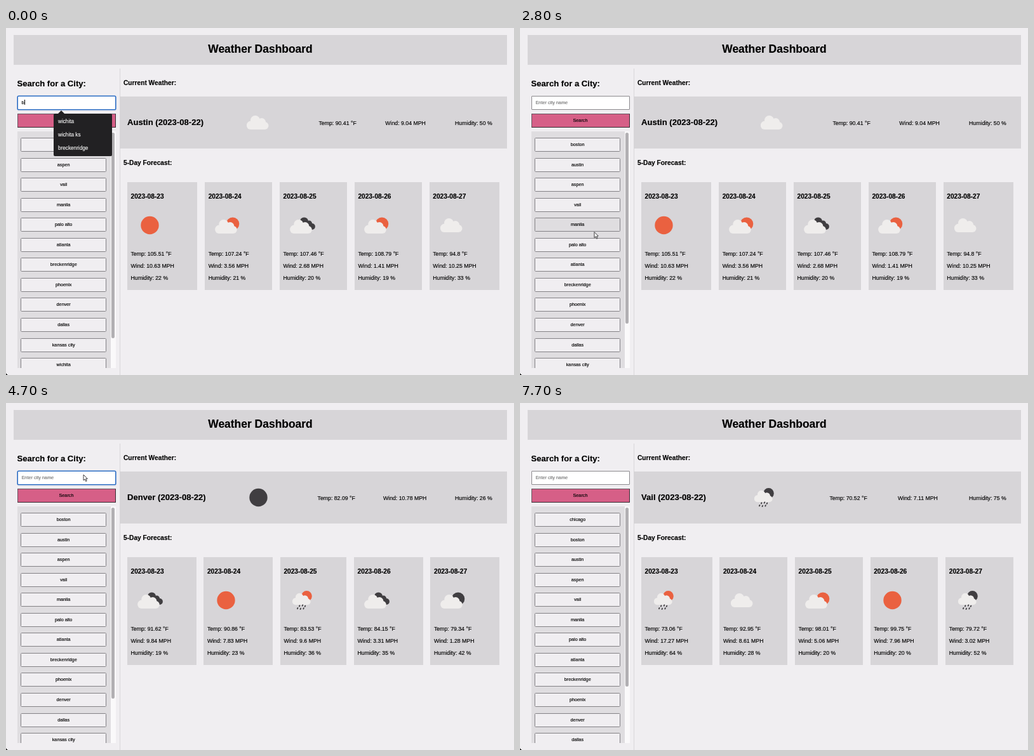
An HTML page that plays this animation: 800 px wide and 547 px high, repeating every 7800 ms.

```html
<!DOCTYPE html>
<html lang="en">
<head>
<meta charset="utf-8">
<title>Weather Dashboard</title>
<style>
  html, body { margin: 0; width: 100%; height: 100%; overflow: hidden; }
  body { background: #f0eef1; color: #000; font: 8.73px/12px "Liberation Sans", Arial, sans-serif;
         -webkit-text-stroke: .15px; }
  #stage { position: relative; width: 800px; height: 547px; overflow: hidden; white-space: nowrap; }
  #stage > *, #list > *, #now > * { position: absolute; box-sizing: border-box; }
  svg { display: block; overflow: visible; }
  h1, h2, h3 { margin: 0; }
  h1 { left: 12px; top: 11px; width: 777px; height: 46.5px; background: #d7d5d8;
       font-size: 17.47px; line-height: 44.5px; text-align: center; }
  h2 { font-size: 13.1px; line-height: 16px; }
  h3 { font-size: 10.2px; line-height: 12px; }
  .rule { left: 178.5px; top: 64px; width: 1px; height: 483px; background: #d9d7da; }
  .corner { left: 0; bottom: 0; width: 4px; height: 4px; background: radial-gradient(circle at 100% 0, transparent 3.6px, #111 4.2px); }

  #field { left: 17.5px; top: 106.5px; width: 155px; height: 22px; background: #fff; border: 1px solid #8b898d;
           border-radius: 1px; padding-left: 6px; font-size: 7.28px; line-height: 20px; color: #757575; }
  #field.focus { border-color: #2a6cc4; box-shadow: 0 0 0 .6px #2a6cc4; border-radius: 2px; }
  #field.typed { color: #000; }
  #field.typed::after { content: ""; display: inline-block; width: .7px; height: 8px; background: #000; vertical-align: -1.5px; }
  .search { left: 17.5px; top: 134.5px; width: 155px; height: 22px; background: #d65f87; border: 1px solid;
            border-color: #66535e #352b31 #352b31 #66535e; font-size: 7.28px; line-height: 20px; text-align: center; }

  #list { left: 17.5px; top: 163px; width: 155px; height: 372.5px; overflow: hidden; background: #dfdde0; }
  .city { left: 5.7px; width: 135px; height: 22px; background: #f0eef1; border: 1px solid #838185; border-radius: 1.5px;
          font-size: 7.28px; line-height: 20px; text-align: center; }
  .city.hover { background: #dfdde0; }
  .track { right: 0; top: 0; width: 7.5px; height: 100%; background: #faf9fa; }
  #thumb { right: 1.5px; top: 1.5px; width: 4.6px; border-radius: 2.3px; background: #b2b0b3; }

  #popup { left: 75px; top: 134.5px; width: 91.5px; height: 67.5px; border-radius: 2px; background: #222123;
           color: #f4f4f4; font-size: 8.2px; line-height: 21px; padding: 2.3px 0 0 7px; }
  #popup::before { content: ""; position: absolute; left: 7px; top: -4.5px; border: 5px solid transparent;
                   border-top: 0; border-bottom-color: #222123; }

  #now { left: 179px; top: 108px; width: 610px; height: 82px; background: #d7d5d8; }
  #now > * { top: 35.8px; }
  #now h2 { left: 12px; top: 32.8px; }
  #now svg { top: 11.3px; }
  #days { left: 191px; top: 243px; width: 586px; height: 169.5px; display: flex; gap: 11.9px; }
  .card { flex: 1 1 auto; box-sizing: border-box; padding: 0 5.5px; background: #d7d5d8; line-height: 18.75px; }
  .card h3 { margin-top: 17.2px; }
  .card svg { margin: 8.8px 0 6.1px; }
</style>
</head>
<body>
<div id="stage">
  <svg width="0" height="0">
    <defs>
      <g id="cloud" fill="#efedec">
        <rect x="-17.5" y="-1" width="34.5" height="12" rx="6"/>
        <circle cx="-4" cy="-3.5" r="7.5"/>
        <circle cx="6.2" cy="-.5" r="6.4"/>
        <circle cx="-11" cy="4" r="6.4"/>
      </g>
      <g id="front"><use href="#cloud" x="-1.7" y="2"/></g>
      <g id="rain">
        <use href="#cloud" transform="translate(-1 -2) scale(.83)"/>
        <path d="M-4 8.2l-.6 1.3M.8 7.4l-.6 1.3M4.8 8.6l-.6 1.3M-7 12l-.6 1.3M-2.4 12.8l-.6 1.3M2.4 12.2l-.6 1.3"
              stroke="#403e41" stroke-width="1.8" stroke-linecap="round"/>
      </g>
      <g id="dark" fill="#403e41">
        <circle cx="3" cy="-6" r="6.6"/><circle cx="10.8" cy="-2.6" r="4.8"/>
        <circle cx="15.5" cy="2" r="4.9"/><rect x="2" y="-4" width="12" height="10"/>
      </g>
    </defs>
  </svg>
  <h1>Weather Dashboard</h1>
  <div class="rule"></div>
  <h2 style="left:17.5px;top:80.2px">Search for a City:</h2>
  <h3 style="left:185px;top:80.6px">Current Weather:</h3>
  <h3 style="left:185px;top:206.6px">5-Day Forecast:</h3>
  <div id="field"></div>
  <div class="search">Search</div>
  <div id="list"></div>
  <div id="now"></div>
  <div id="days"></div>
  <div id="popup">wichita<br>wichita ks<br>breckenridge</div>
  <div class="corner"></div>
  <svg id="mouse" width="8" height="12" style="left:0;top:0">
    <path d="M0 0V9L2.1 7.1 3.7 10.6 5.2 9.9 3.7 6.6 6.3 6.4Z" fill="#fff" stroke="#2b2a2c" stroke-width=".9"/>
  </svg>
</div>
<script>
const LOOP = 7800, STEP = 100, PITCH = 31.55;
const SUN = '#ea6140', NIGHT = '#403e41';
const $ = id => document.getElementById(id);

const disc = (color, x, y, r) => `<circle cx="${x}" cy="${y}" r="${r}" fill="${color}"/>`;
const use = id => `<use href="#${id}"/>`;
const icons = {
  sun: disc(SUN, 0, 0, 14.2),
  night: disc(NIGHT, 0, 0, 14.2),
  cloud: use('cloud'),
  few: disc(SUN, 8.5, -2.3, 10.3) + use('front'),
  fewNight: disc(NIGHT, 8.5, -2.3, 10.3) + use('front'),
  broken: use('dark') + use('front'),
  rain: disc(SUN, 7, -6.6, 8.3) + use('rain'),
  rainNight: disc(NIGHT, 7, -6.6, 8.3) + use('rain')
};

// now: icon, temp, wind, humidity; x: icon centre, temp and wind columns; days: icon, temp, wind, humidity
const weather = {
  Austin: { now: ['cloud', 90.41, 9.04, 50], x: [396.7, 492.5, 597.3], days: [
    ['sun', 105.51, 10.63, 22], ['few', 107.24, 3.56, 21], ['broken', 107.46, 2.68, 20],
    ['few', 108.79, 1.41, 19], ['cloud', 94.8, 10.25, 33]] },
  Boston: { now: ['rainNight', 68.31, 5.48, 87], x: [400, 494, 598], days: [
    ['few', 72.5, 5.84, 42], ['broken', 69.15, 7.14, 65], ['rain', 72.21, 5.1, 82],
    ['rain', 67.24, 4.63, 76], ['cloud', 60.76, 5.06, 86]] },
  'Palo Alto': { now: ['broken', 69.06, 4.12, 76], x: [406.5, 498, 600], days: [
    ['few', 86.86, 7.18, 35], ['sun', 84, 7.78, 34], ['sun', 78.37, 8.41, 41],
    ['sun', 81.07, 8.68, 31], ['night', 65.1, 6.33, 65]] },
  Denver: { now: ['night', 82.09, 10.78, 26], x: [397.5, 490.6, 594], days: [
    ['broken', 91.62, 9.84, 19], ['sun', 90.86, 7.83, 23], ['rain', 83.53, 9.6, 36],
    ['broken', 84.15, 3.31, 35], ['fewNight', 79.34, 1.28, 42]] },
  Chicago: { now: ['broken', 69.62, 7.07, 82], x: [404, 496.5, 599.3], days: [
    ['broken', 93.72, 8.46, 43], ['broken', 94.96, 7.52, 36], ['cloud', 78.55, 8.21, 56],
    ['broken', 72.18, 12.86, 64], ['broken', 67.59, 12.57, 75]] },
  Vail: { now: ['rainNight', 70.52, 7.11, 75], x: [384.6, 487.5, 595], days: [
    ['rain', 73.06, 17.27, 64], ['cloud', 92.95, 8.61, 28], ['few', 98.01, 5.06, 20],
    ['sun', 99.75, 7.96, 20], ['rainNight', 79.72, 3.02, 52]] }
};
const shown = [[0, 'Austin'], [700, 'Boston'], [2000, 'Austin'], [3000, 'Palo Alto'],
               [4100, 'Denver'], [5700, 'Chicago'], [7000, 'Vail']];
const history = ['austin', 'aspen', 'vail', 'manila', 'palo alto', 'atlanta', 'breckenridge',
                 'phoenix', 'denver', 'dallas', 'kansas city', 'wichita'];
const typing = [{ word: 'boston', from: 0, sent: 600 }, { word: 'chicago', from: 4900, sent: 5600 }];

// Each run is one visible stretch of the pointer: [ms, x, y]
const runs = [
  [[1000, 124, 110], [1100, 125, 103.5], [1300, 119, 150], [1600, 112, 214], [2500, 113, 217],
   [2800, 117, 321.6], [2900, 117, 340], [3000, 117, 342], [3200, 116, 467], [3500, 116, 467],
   [3600, 116.5, 475], [4300, 116.5, 475], [4700, 122, 113]],
  [[6100, 122, 113], [6400, 113, 230], [6700, 109.7, 308], [7300, 109.7, 308],
   [7500, 148.5, 215], [7600, 405, 1]]
];

const icon = (name, style = '') =>
  `<svg width="59" height="60" viewBox="-29.5 -30 59 60" style="${style}">${icons[name]}</svg>`;
const labels = ([, temp, wind, hum]) => [`Temp: ${temp} °F`, `Wind: ${wind} MPH`, `Humidity: ${hum} %`];

function showWeather(city) {
  const { now, x, days } = weather[city];
  const [temp, wind, hum] = labels(now);
  $('now').innerHTML = `<h2>${city} (2023-08-22)</h2>` + icon(now[0], `left:${x[0] - 208.5}px`) +
    `<div style="left:${x[1] - 179}px">${temp}</div><div style="left:${x[2] - 179}px">${wind}</div>` +
    `<div style="right:23.3px">${hum}</div>`;
  $('days').innerHTML = days.map((day, i) =>
    `<div class="card"><h3>2023-08-${23 + i}</h3>${icon(day[0])}` +
    labels(day).map(s => `<div>${s}</div>`).join('') + '</div>').join('');
}

function showList(cities, hover) {
  const thumb = 369 * 369 / (cities.length * PITCH + 41);
  $('list').innerHTML = cities.map((name, i) =>
    `<div class="city${i === hover ? ' hover' : ''}" style="top:${10 + i * PITCH}px">${name}</div>`).join('') +
    `<div class="track"></div><div id="thumb" style="height:${thumb}px"></div>`;
}

function pointer(t) {
  const run = runs.find(r => t >= r[0][0] && t <= r[r.length - 1][0]);
  if (!run) return null;
  const i = Math.max(1, run.findIndex(k => k[0] >= t));
  const [t0, x0, y0] = run[i - 1], [t1, x1, y1] = run[i];
  const p = (t - t0) / (t1 - t0);
  return [x0 + (x1 - x0) * p, y0 + (y1 - y0) * p];
}

function hovered(pos) {
  if (!pos || pos[0] > 158 || pos[1] < 173) return -1;
  const row = Math.floor((pos[1] - 173) / PITCH);
  return pos[1] - 173 - row * PITCH < 23 ? row : -1;
}

let lastCity, lastStep;
function render(t) {
  const city = shown.filter(s => s[0] <= t).pop()[1];
  if (city !== lastCity) showWeather(lastCity = city);

  const entry = typing.find(e => t >= e.from && t < e.sent);
  const field = $('field');
  field.textContent = entry ? entry.word.slice(0, (t - entry.from) / STEP + 1) : 'Enter city name';
  field.classList.toggle('typed', !!entry);
  field.classList.toggle('focus', t < 1800 || (t >= 4700 && t < 6800));
  $('popup').style.display = t < STEP ? '' : 'none';

  const pos = pointer(t);
  $('mouse').style.display = pos ? '' : 'none';
  if (pos) $('mouse').style.transform = `translate(${pos[0]}px, ${pos[1]}px)`;

  const added = typing.filter(e => t >= e.sent).map(e => e.word).reverse();
  showList([...added, ...history], hovered(pos));
}

const start = performance.now();
function tick() {
  const t = Math.floor(((performance.now() - start) % LOOP) / STEP) * STEP;
  if (t !== lastStep) render(lastStep = t);
  requestAnimationFrame(tick);
}
tick();
</script>
</body>
</html>
```
